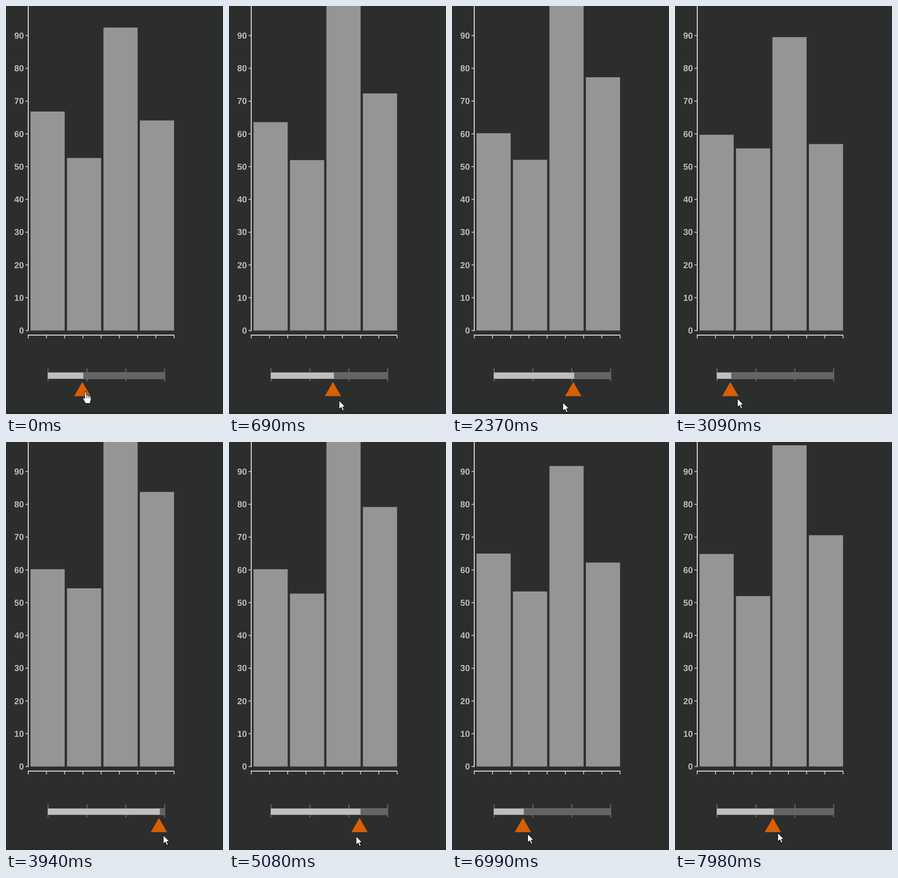
A matplotlib script that plays this animation: 400 px wide and 750 px high, repeating every 8000 ms.

```python
import numpy as np
import matplotlib.pyplot as plt
from matplotlib.animation import FuncAnimation
from matplotlib.patches import PathPatch, Polygon, Rectangle
from matplotlib.textpath import TextPath
from matplotlib.transforms import Affine2D

W, H, DPI = 400, 750, 100
PX = 72 / DPI
LOOP, INTERVAL = 8000, 20
TICK, PHASE = 1000 / 7, 90      # the pose is refreshed every TICK ms
LAG = 65                        # the knob trails the pointer by this time

BG, AXIS, LABEL = "#2c2d2d", "#c8c8c8", "#bdbdbd"
BAR, TRACK, FILL, KNOB = "#959595", "#646464", "#bfbfbf", "#d95f02"

LEFT, BASE = 41, 596.5
BAND, UNIT = 67.2, 6.024
STOPS = np.linspace(77.5, 292.5, 4)
# Value of each bar at the four slider stops
SERIES = [(55.3, 68.4, 60.2, 60.2), (57.4, 52, 52, 54.8),
          (87.7, 93.1, 104.5, 109), (52.4, 65.7, 77, 85)]

# Turning points (time, position), eased in between
KNOB_PATH = [(90, 140.5), (1519, 285), (1900, 285), (2820, 78),
             (4125, 292.5), (4372, 292.5), (6447, 104), (6600, 104),
             (7250, 152), (7600, 152), (8250, 203)]
POINTER_PATH = [(90, 709), (900, 729.5), (2000, 729.5), (3090, 721.5),
                (5080, 724.5), (7980, 718.5)]

ARROW = np.array([(0, 0), (0, 16), (3.8, 12.6), (6.4, 18.6), (9, 17.5),
                  (6.5, 11.6), (11.3, 11.4)])
HAND = np.array([(-1.5, 0), (1.5, 0), (1.5, 5.5), (10, 8), (10.5, 14),
                 (8.5, 21.5), (0, 21.5), (-5.5, 11.5), (-4, 10.4),
                 (-1.5, 13)])
TRIANGLE = np.array([(0.2, 691), (15.3, 717.2), (-14.8, 717.2)])

fig = plt.figure(figsize=(W / DPI, H / DPI), dpi=DPI, facecolor=BG)
ax = fig.add_axes([0, 0, 1, 1])
ax.set(xlim=(0, W), ylim=(H, 0))
ax.axis("off")


def box(x0, y0, x1, y1, color):
    return ax.add_patch(Rectangle((x0, y0), x1 - x0, y1 - y0, fc=color,
                                  lw=0, snap=False))


def shape(points, color, edge="none", width=0):
    return ax.add_patch(Polygon(points, fc=color, ec=edge, lw=width * PX))


def label(text, right, baseline, size=16):
    path = TextPath((0, 0), text, size=size,
                    prop={"family": "Liberation Sans", "weight": "bold"})
    left = right - 0.556 * size * len(text)
    place = Affine2D().scale(1, -1).translate(left, baseline)
    ax.add_patch(PathPatch(path, fc=LABEL, lw=0,
                           transform=place + ax.transData))


def along(path, t):
    """Position at time t on a path that eases in and out of each point."""
    times, places = np.transpose(path)
    i = np.clip(np.searchsorted(times, t, "right") - 1, 0, len(times) - 2)
    u = np.clip((t - times[i]) / (times[i + 1] - times[i]), 0, 1)
    return places[i] + (places[i + 1] - places[i]) * u * u * (3 - 2 * u)


box(0, 748, W, H, "#262727")

bars = [box(LEFT + BAND * i + 4.2, 0, LEFT + BAND * (i + 1), BASE, BAR)
        for i in range(4)]

box(LEFT - 1, 0, LEFT + 1, BASE + 1, AXIS)
for value in range(0, 100, 10):
    y = BASE - value * UNIT
    box(36, y - 0.8, LEFT, y + 0.8, AXIS)
    label(str(value), 33, round(y + 5.5))

box(LEFT - 1, 604, 310, 606, AXIS)
for x in LEFT + BAND / 2 * np.arange(9):
    box(x - 0.8, 605, x + 0.8, 611, AXIS)

for x in STOPS:
    box(x - 1, 666, x + 1, 690, TRACK)
box(77, 673, 293, 686, TRACK)
fill = box(77, 674, 78, 685, FILL)
knob = shape(TRIANGLE, KNOB)
arrow = shape(ARROW, "white", "#101010", 1)

hand_x, hand_y = 146.5, 709
hand = [shape(HAND + (hand_x, hand_y), "white", "#101010", 1)]
for i in range(3):
    x = hand_x + 1.7 + 3 * i
    hand += ax.plot([x, x], [hand_y + 6 + i, hand_y + 10.5],
                    color="#101010", lw=0.9 * PX)


def draw(frame):
    now = frame * INTERVAL + INTERVAL / 2
    t = np.floor((now - PHASE) / TICK + 1e-6) * TICK + PHASE
    x = along(KNOB_PATH, t)

    for bar, values in zip(bars, SERIES):
        height = UNIT * np.interp(x, STOPS, values)
        bar.set_y(BASE - height)
        bar.set_height(height)
    fill.set_width(x + 2 - 77)
    knob.set_xy(TRIANGLE + (x, 0))

    hovering = now < 150
    arrow.set_xy(ARROW + (along(KNOB_PATH, t + LAG) + 2,
                          along(POINTER_PATH, t)))
    arrow.set_visible(not hovering)
    for part in hand:
        part.set_visible(hovering)
    return [*bars, fill, knob, arrow, *hand]


anim = FuncAnimation(fig, draw, frames=LOOP // INTERVAL, interval=INTERVAL,
                     repeat=True, repeat_delay=0, blit=False)
plt.show()
```
